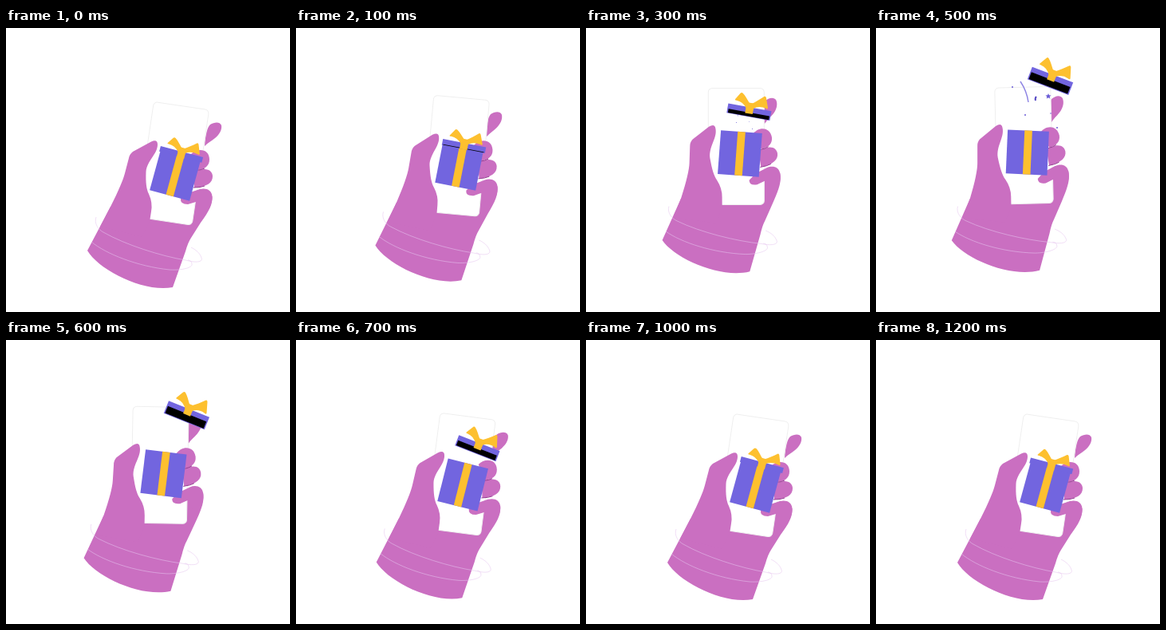
Recreate the animation shown at these times as an HTML page. Size 356x356 px, loop 1300 ms.

```html
<!DOCTYPE html>
<html lang="en">
<head>
<meta charset="utf-8">
<title>Gift on a phone</title>
<style>
  html, body { margin: 0; width: 100%; height: 100%; overflow: hidden; background: #fff; }
  svg { display: block; width: 100vw; height: 100vh; }
  .skin { fill: #ca6fc1; }
  .box { fill: #7265df; }
  .gold { fill: #fdc02f; }
  .crease { fill: none; stroke: #943d91; stroke-width: 1; }
  .ring { fill: none; stroke: #e6c5ee; stroke-width: 1; opacity: .55; }
</style>
</head>
<body>
<svg viewBox="0 0 356 356">
  <path class="skin" data-d="M249,148 C250,135 252,125 256,121 C261,118 268,117 270,122 C271,128 267,134 262,138 C257,142 253,144 249,148 Z"/>
  <path class="skin" data-d="M102,279 C116,303 172,332 209,325 L225,280 Q228,269 232,263 L244,244 C255,229 259,221 258.5,211 L240,212 L180,215 L131,224 Z"/>
  <rect id="phone" x="-35" y="-73" width="70" height="146" rx="5" fill="#fff" stroke="#efefef"/>
  <path class="skin" data-d="M118,249 L131,224 C141,204 147,190 149,182 L154,163 Q155,158 159,155 L182,142.5 Q190,139 190,146 C190,158 177,166 175.5,180 C175,194 176,202 179,208 Q184,219 182,230 L180,243 L170,262 Z"/>
  <path class="skin" data-d="M232,158 C240,150 255,151 255,165 C255,173 249,177 240,178 Z"/>
  <path class="skin" data-d="M236,180 C252,173 259,179 259,186 C259,194 252,199 236,200 Z"/>
  <path class="skin" data-d="M219,214 Q218,221 228,221 L238,218 L245,235 C255,229 259,219 258.5,211 C258,203 251,200 243,202 L228,207 Z"/>
  <path class="crease" data-d="M238,178.5 Q245,178 249,176"/>
  <path class="crease" data-d="M235,200 Q244,200 249,198"/>
  <path class="ring" data-arm data-d="M113,237 C110,245 116,253 122,256 C150,272 195,286 225,291 C240,295 247,293 245,288 C243,282 238,278 232,275"/>
  <path class="ring" data-arm data-d="M107,268 C125,283 165,299 205,303 C222,304 234,300 233,296 C233,293 231,291 228,291"/>

  <g id="body">
    <rect class="box" x="-25.8" y="-55" width="51.8" height="55"/>
    <rect class="gold" x="-4.6" y="-55" width="9.6" height="55"/>
  </g>
  <g id="confetti" fill="#6a5bd6">
    <path d="M-9,-61 Q-1,-49 1,-35" fill="none" stroke="#8d83e3" stroke-width="1.4"/>
    <path d="M11,-42 Q9,-40 10,-37" fill="none" stroke="#5548c4" stroke-width="2"/>
    <path d="M26,-46 l1,2.2 2.5,.3 -1.8,1.6 .5,2.4 -2.2,-1.2 -2.2,1.2 .5,-2.4 -1.8,-1.6 2.5,-.3 Z"/>
    <circle cx="-19" cy="-54" r="1"/>
    <circle cx="-3" cy="-19" r="1"/>
    <circle cx="37" cy="-3" r="1"/>
    <circle cx="29" cy="-21" r=".8"/>
  </g>
  <g id="lid">
    <rect id="shell" class="box" x="-27.5" width="55"/>
    <rect id="inside" x="-26" y="6.5" width="52"/>
    <rect class="gold" x="-4.8" y="-1" width="9.6" height="9"/>
    <g id="bow" class="gold">
      <path d="M-1,2 L-1,-4 C-5,-8 -8,-12 -12,-14.5 Q-14,-15.5 -15,-13.5 L-20,-6 Q-20.5,-4.5 -18,-5 Q-10,-5 -4,2 Z"/>
      <path d="M0,2 L1,-4 C6,-7 11,-11 15.5,-15 Q17,-16 18,-14 L22.3,-3 Q22.5,-1 20,-2 Q11,-4 4,1 Z"/>
      <rect x="-4.8" y="-5" width="9.6" height="8" rx="2.5"/>
    </g>
  </g>
</svg>
<script>
  const LOOP = 1300, STEP = 100;

  // time | hand x y turn | arm x y turn | body x y turn | lid x y turn | lid opening
  const rest = [209.2, 169.8, 0, 155.5, 302.5, 0, 205, 210, 15.3, 220.5, 155, 14.8, 0];
  const keys = [
    [0, ...rest],
    [200, 191.2, 149.8, -7.2, 151, 287, -2.8, 193, 186.5, 6, 202, 124.5, 7, 2.5],
    [500, 185.5, 147.2, -9.9, 150, 285.5, -4.5, 188.5, 183.5, 2.5, 221.5, 58.5, 21, 10],
    [600, 192.8, 156.8, -7.4, 152, 294.5, -2.4, 194, 195, 7, 229.5, 86.5, 22, 10],
    [800, 215, 175, 3.6, 156, 305, 0.3, 207.5, 216, 18.8, 230, 156.5, 20, 3],
    [1000, ...rest.slice(0, 9), 221.3, 153.2, 15, 0],
    [LOOP, ...rest]
  ];

  const $ = id => document.getElementById(id);
  const clamp = v => Math.max(0, Math.min(1, v));
  const limbs = [...document.querySelectorAll('[data-d]')];

  // Monotone cubic through the keys: no overshoot, flat at turning points.
  const slope = (i, c) => (keys[i + 1][c] - keys[i][c]) / (keys[i + 1][0] - keys[i][0]);
  function tangent(i, c) {
    if (i === 0 || i === keys.length - 1) return 0;
    const a = slope(i - 1, c), b = slope(i, c);
    return a * b > 0 ? 2 * a * b / (a + b) : 0;
  }
  function poseAt(t) {
    let i = 0;
    while (t >= keys[i + 1][0]) i++;
    const span = keys[i + 1][0] - keys[i][0], u = (t - keys[i][0]) / span;
    const s = u * u * (3 - 2 * u);
    return rest.map((_, n) => {
      const c = n + 1;
      return keys[i][c] * (1 - s) + keys[i + 1][c] * s +
        span * (u * (1 - u) ** 2 * tangent(i, c) - u * u * (1 - u) * tangent(i + 1, c));
    });
  }

  // Moves a resting point rigidly with the part whose pose starts at index n.
  function carry(x, y, pose, n) {
    const a = pose[n + 2] * Math.PI / 180, dx = x - rest[n], dy = y - rest[n + 1];
    return [pose[n] + dx * Math.cos(a) - dy * Math.sin(a),
            pose[n + 1] + dx * Math.sin(a) + dy * Math.cos(a)];
  }

  // The wrist blends hand and arm; thumb and index finger swing a little further.
  function bend(x, y, pose, armOnly) {
    const hand = carry(x, y, pose, 0), arm = carry(x, y, pose, 3);
    const w = armOnly ? 0 : clamp((268 - y) / 43);
    const base = x < 200 ? 195 : 160;
    const swing = pose[2] * clamp((base - y) / 45);
    return [arm[0] + (hand[0] - arm[0]) * w + swing * 0.4,
            arm[1] + (hand[1] - arm[1]) * w + swing * 0.2];
  }

  function place(id, x, y, turn) {
    $(id).setAttribute('transform', `translate(${x} ${y}) rotate(${turn})`);
  }

  function draw(t) {
    const p = poseAt(t), open = p[12];
    for (const el of limbs) {
      const arm = 'arm' in el.dataset;
      el.setAttribute('d', el.dataset.d.replace(/([\d.]+),([\d.]+)/g, (_, x, y) =>
        bend(+x, +y, p, arm).map(v => v.toFixed(2)).join(',')));
    }
    place('phone', p[0], p[1], 8.5 + p[2]);
    place('body', p[6], p[7], p[8]);
    place('lid', p[9], p[10], p[11]);
    $('shell').setAttribute('height', 7 + open * 0.97);
    $('inside').setAttribute('height', open * 0.93);
    $('bow').setAttribute('transform', `scale(1 ${1 + open * 0.02})`);

    const burst = t >= 300 && t <= 500;
    $('confetti').setAttribute('visibility', burst ? 'visible' : 'hidden');
    const spread = 0.5 + (t - 300) / 400;
    $('confetti').setAttribute('transform', `translate(190 128) scale(${spread})`);
  }

  const start = performance.now();
  function tick() {
    const t = (performance.now() - start) % LOOP;
    draw(Math.floor(t / STEP) * STEP);
    requestAnimationFrame(tick);
  }
  tick();
</script>
</body>
</html>
```
